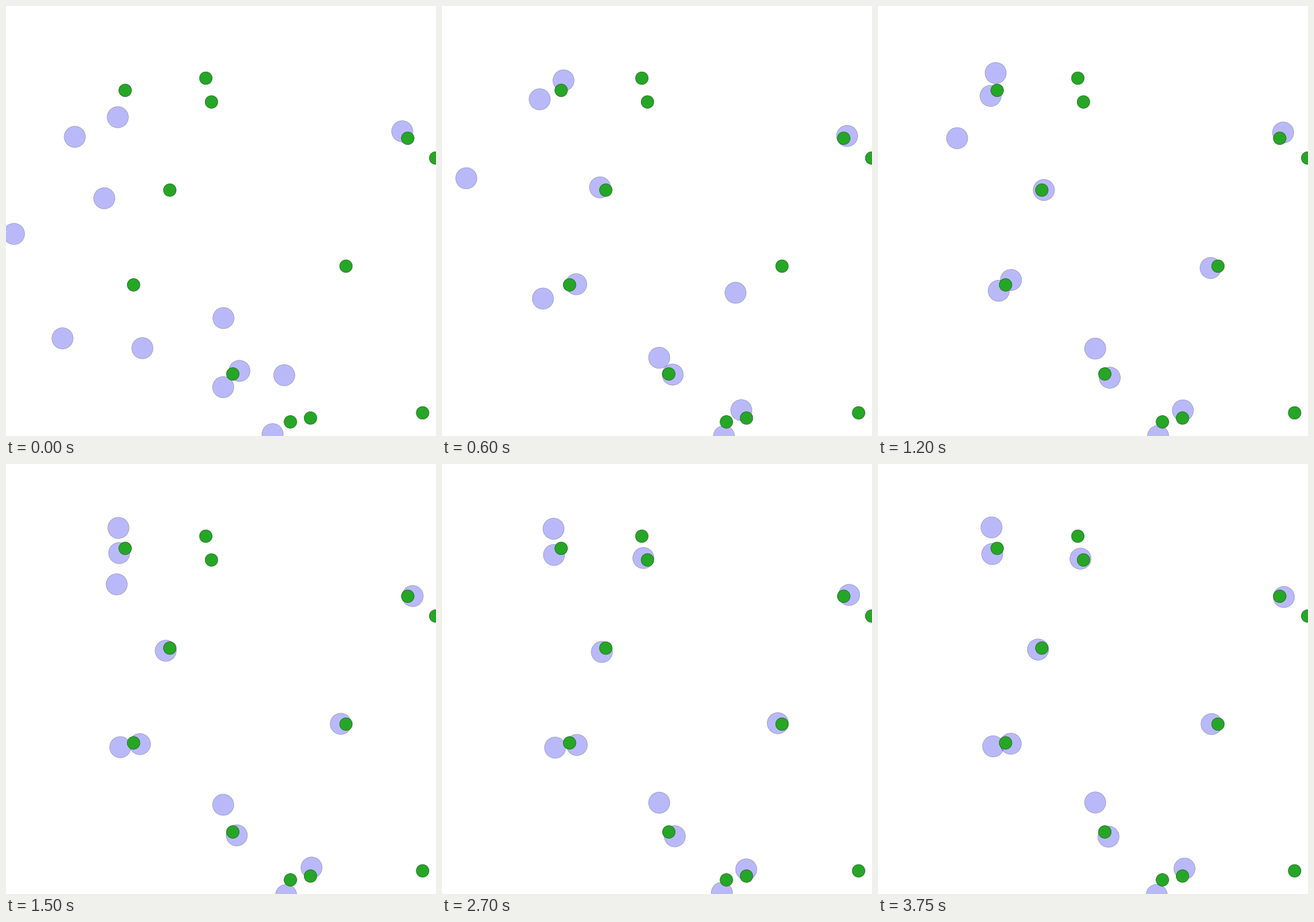
These frames come from a looping animation (700 by 700 pixels, 3900 ms). A matplotlib script:

```python
import numpy as np
import matplotlib.pyplot as plt
from matplotlib.animation import FuncAnimation
from matplotlib.patches import Circle

SIZE, DPI = 700, 100
FRAMES, INTERVAL = 26, 150
PX = 72 / DPI  # points per pixel
STEP = np.arange(FRAMES)

ARRIVALS = (0, 2, 6)  # steps at which the first points of a route are reached
CRUISE = 21           # pixels per step on a long last leg
HOVER = 2             # radius of the slow circling around the resting place
GLIDE_DECAY = 0.747   # share of the way left after each step

FOOD = [(325.3, 117.5), (194, 137.3), (334.5, 156.2), (654, 215.3),
        (699.5, 247.5), (266.7, 299.7), (553.5, 423.5), (207.7, 454),
        (369.2, 599), (463, 677), (495.7, 670.8), (678.2, 662.3)]

# Start, turning points and resting place of each agent
ROUTES = [
    [(182, 181), (193, 127), (200, 117), (183, 104)],
    [(112, 213), (125, 164), (184, 147)],
    [(13, 371), (13, 335), (85, 236), (328, 153)],
    [(645, 204), (662, 226), (657, 197), (662, 215)],
    [(160, 313), (214, 296), (280, 295), (260, 304)],
    [(92, 541), (109, 489), (207, 469), (186, 461)],
    [(222, 557), (222, 489), (215, 436), (218, 456)],
    [(354, 508), (402, 500), (532, 435), (545, 423)],
    [(380, 594), (374, 594), (377, 606)],
    [(453, 601), (470, 655), (497, 659)],
    [(434, 697), (463, 701), (455, 700)],
]
GLIDE_START, GLIDE_END = np.array([353.6, 620.5]), np.array([353.6, 551])


def tangents(t, p):
    """Slopes that pass the points without overshoot and come to rest."""
    d = np.diff(p, axis=0) / np.diff(t)[:, None]
    a, b = d[:-1], d[1:]
    same = a * b > 0
    inner = np.where(same, 2 * a * b / np.where(same, a + b, 1), 0)
    return np.vstack([d[:1], inner, np.zeros((1, 2))])


def travel(route):
    """Cubic Hermite path along the route; returns it with its last step."""
    p = np.array(route, float)
    t = np.array(ARRIVALS[:len(p) - 1], float)
    leg = np.hypot(*(p[-1] - p[-2]))
    t = np.append(t, t[-1] + max(4, leg / CRUISE))
    m = tangents(t, p)
    n = np.minimum(STEP, t[-1])
    i = np.clip(np.searchsorted(t, n, side="right") - 1, 0, len(t) - 2)
    h = (t[i + 1] - t[i])[:, None]
    s = (n - t[i])[:, None] / h
    path = ((1 + 2 * s) * (1 - s) ** 2 * p[i] + s * (1 - s) ** 2 * h * m[i]
            + s * s * (3 - 2 * s) * p[i + 1] + s * s * (s - 1) * h * m[i + 1])
    return path, t[-1]


def hover(rest, rng):
    """Slow circling that fades in once the agent has come to rest."""
    angle = rng.uniform(0, 2 * np.pi) + rng.choice([-0.5, 0.5]) * STEP
    radius = HOVER * np.clip((STEP - rest) / 4, 0, 1)
    return radius[:, None] * np.column_stack([np.cos(angle), np.sin(angle)])


def all_paths():
    rng = np.random.default_rng(4)
    glide = GLIDE_END + (GLIDE_START - GLIDE_END) * GLIDE_DECAY ** STEP[:, None]
    paths = [glide]
    for route in ROUTES:
        path, rest = travel(route)
        paths.append(path + hover(rest, rng))
    return paths


fig = plt.figure(figsize=(SIZE / DPI, SIZE / DPI), dpi=DPI, facecolor="white")
ax = fig.add_axes([0, 0, 1, 1])
ax.set_xlim(0, SIZE)
ax.set_ylim(SIZE, 0)
ax.axis("off")


def disc(center, radius, face, edge, z):
    return ax.add_patch(Circle(center, radius, facecolor=face, edgecolor=edge,
                               linewidth=0.7 * PX, zorder=z))


paths = all_paths()
agents = [disc(path[0], 17.3, ("#3737f1", 0.35), ("#00001a", 0.32), 1)
          for path in paths]
for spot in FOOD:
    disc(spot, 10.3, "#26a626", "#145c14", 2)


def update(n):
    for agent, path in zip(agents, paths):
        agent.center = tuple(path[n])
    return agents


anim = FuncAnimation(fig, update, frames=FRAMES, interval=INTERVAL,
                     repeat=True, repeat_delay=0)
plt.show()
```
